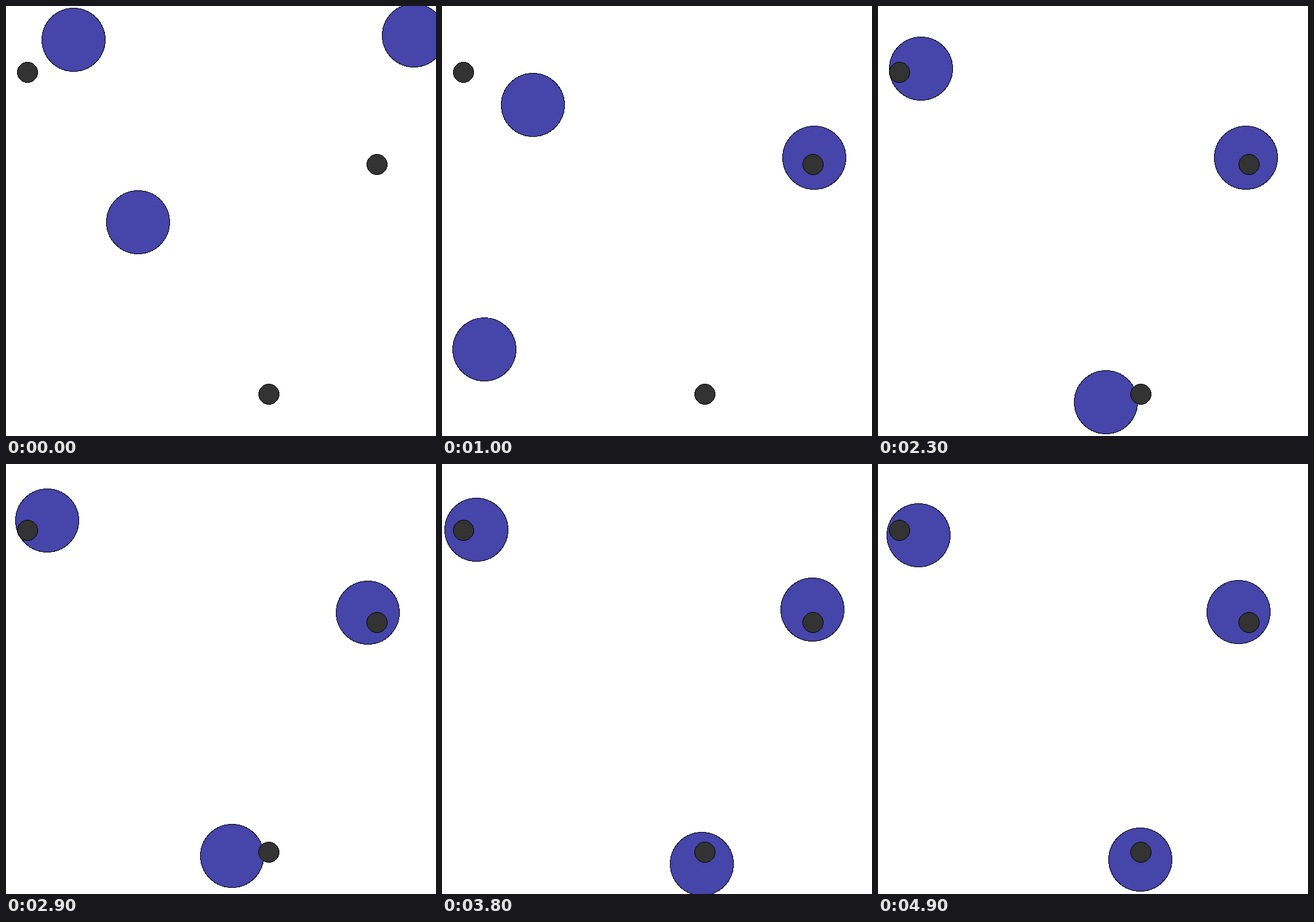
An HTML page for the animation above (5000 ms loop, 700 px wide and 700 px high).

```html
<!DOCTYPE html>
<html lang="en">
<head>
<meta charset="utf-8">
<title>Drifting discs</title>
<style>
  html, body { margin: 0; width: 100%; height: 100%; overflow: hidden; background: #fff; }
  svg { display: block; width: 100%; height: 100%; }
  circle { stroke: #000; stroke-width: 1; shape-rendering: crispEdges; }
  .disc { fill: #4545aa; r: 51.5px; }
  .dot { fill: #333; r: 16.5px; }
</style>
</head>
<body>
<svg id="stage" viewBox="0 0 700 700"></svg>
<script>
const LOOP = 5000, STEP = 100;
const dots = [[35, 108], [604, 258], [428, 632]];

// Each row: step, x, y
const paths = [
  [[0, 110, 55], [6, 179, 194], [10, 148, 161], [12, 130, 130], [17, 78, 125],
   [24, 69, 98], [26, 52, 104], [29, 67, 92], [34, 52, 92], [38, 56, 107],
   [42, 63, 91], [49, 66, 116]],
  [[0, 664, 48], [6, 664, 206], [10, 606, 247], [14, 637, 222], [17, 619, 228],
   [21, 597, 247], [26, 603, 246], [29, 589, 242], [38, 603, 237], [42, 627, 243],
   [49, 587, 241]],
  [[0, 215, 352], [6, 52, 350], [10, 69, 559], [12, 147, 600], [17, 351, 620],
   [21, 372, 647], [29, 368, 638], [38, 423, 651], [49, 427, 644]]
];

const stage = document.getElementById("stage");

function place(c, x, y) {
  c.setAttribute("cx", x);
  c.setAttribute("cy", y);
}

function addCircle(kind, x, y) {
  const c = document.createElementNS(stage.namespaceURI, "circle");
  c.setAttribute("class", kind);
  place(c, x, y);
  return stage.appendChild(c);
}

function posAt(path, step) {
  const i = path.findIndex(p => p[0] >= step);
  const [s1, x1, y1] = path[i];
  if (s1 === step) return [x1, y1];
  const [s0, x0, y0] = path[i - 1];
  const k = (step - s0) / (s1 - s0);
  return [Math.round(x0 + (x1 - x0) * k), Math.round(y0 + (y1 - y0) * k)];
}

const discs = paths.map(([[, x, y]]) => addCircle("disc", x, y));
dots.forEach(([x, y]) => addCircle("dot", x, y));

const start = performance.now();
function draw(now) {
  const step = Math.floor(Math.max(0, now - start) % LOOP / STEP);
  discs.forEach((d, i) => place(d, ...posAt(paths[i], step)));
  requestAnimationFrame(draw);
}
draw(start);
</script>
</body>
</html>
```
